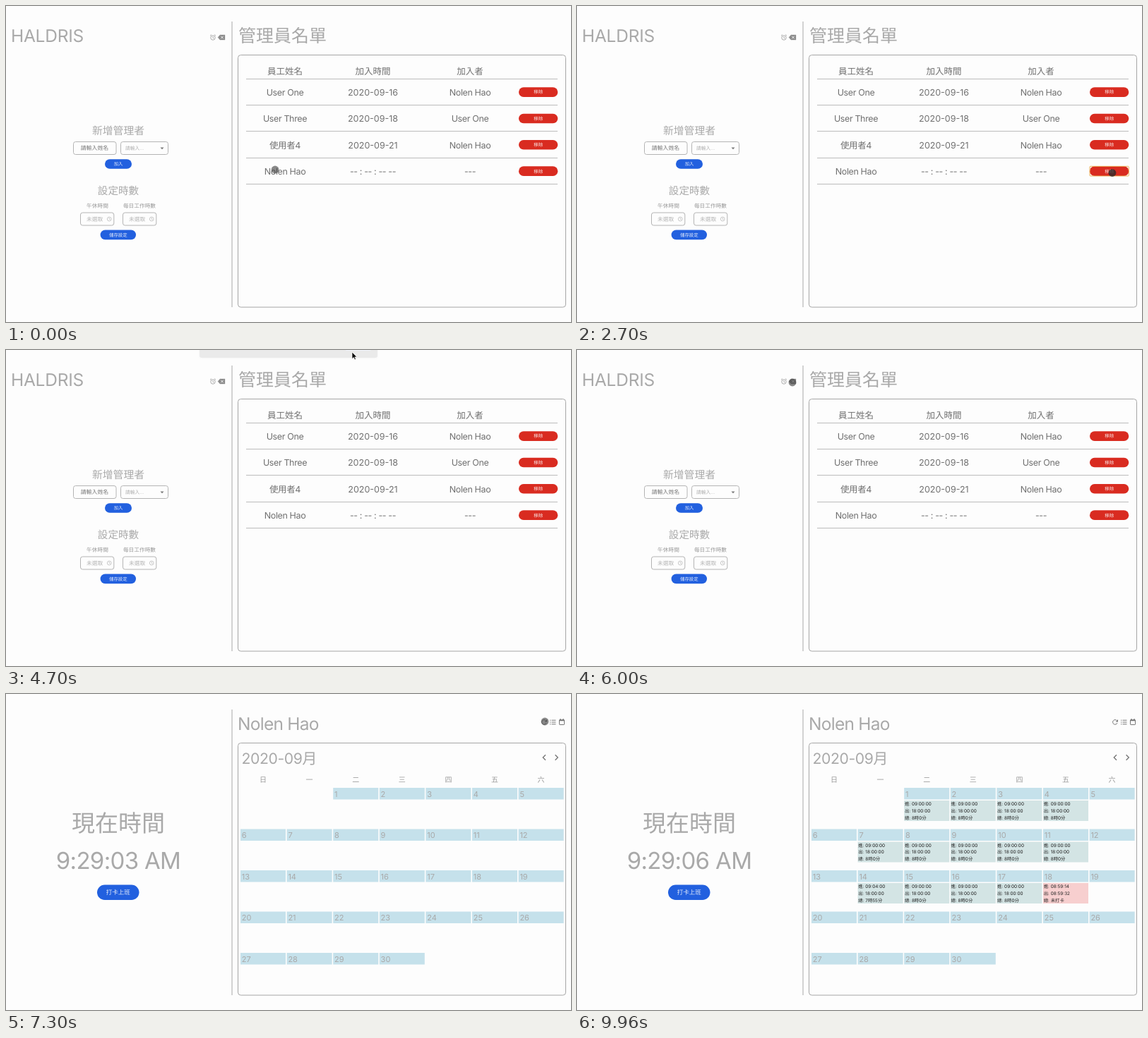
Animation, 800 px wide and 448 px high, one loop 10000 ms. Source, as an HTML page:

```html
<!DOCTYPE html>
<html lang="zh-Hant">
<head>
<meta charset="utf-8">
<title>Attendance admin</title>
<style>
html, body { margin: 0; width: 100%; height: 100%; overflow: hidden; background: #fdfdfd; }
svg { display: block; width: 100%; height: 100%; }
text {
  font-family: Inter, "Noto Sans CJK TC", "Noto Sans CJK", sans-serif;
  text-rendering: geometricPrecision;
  white-space: pre;
}
.sheet { filter: drop-shadow(0 1px 2px rgba(0, 0, 0, .35)); }
</style>
</head>
<body>
<svg id="stage" viewBox="0 0 800 448"></svg>
<script>
const LOOP = 10000;
const GRAY = '#a9a9a9', INK = '#707070', RED = '#d92b20', BLUE = '#2260df';
const RULE = '#bcbcbc', FIELD = '#b4b4b4';
const ADMIN = 'Nolen Hao';
const stage = document.getElementById('stage');

function el(parent, tag, attrs = {}) {
  const node = document.createElementNS('http://www.w3.org/2000/svg', tag);
  for (const k in attrs) node.setAttribute(k, attrs[k]);
  return parent.appendChild(node);
}
const group = (parent = stage) => el(parent, 'g');

// cy is the optical middle of the line
function label(parent, str, x, cy, size, fill, anchor = 'start', track = 0) {
  const t = el(parent, 'text', {
    x, y: cy + size * 0.364, 'font-size': size, fill,
    'text-anchor': anchor, 'letter-spacing': track + 'em'
  });
  t.textContent = str;
  return t;
}
const mid = (p, str, x, cy, size, fill, track) => label(p, str, x, cy, size, fill, 'middle', track);

function box(parent, x, y, width, height, rx, fill, stroke = 'none') {
  return el(parent, 'rect', { x, y, width, height, rx, fill, stroke });
}
function path(parent, d, stroke, width = 1, fill = 'none') {
  return el(parent, 'path', { d, stroke, fill, 'stroke-width': width });
}
function pill(parent, x, y, w, h, fill, str, size) {
  box(parent, x, y, w, h, h / 2, fill);
  mid(parent, str, x + w / 2, y + h / 2, size, 'rgba(255,255,255,.9)');
}

// Shared frame
path(stage, 'M320 22V427', '#a8a8a8');
box(stage, 328.5, 69.5, 464, 357.5, 4, 'none', '#a6a6a6');

// Admin page
const admin = group();
label(admin, 'HALDRIS', 7, 42, 24.5, GRAY, 'start', -0.01);
label(admin, '管理員名單', 329, 42, 25, GRAY);

el(admin, 'circle', { cx: 293, cy: 45, r: 3.2, fill: 'none', stroke: '#999', 'stroke-width': 0.8 });
path(admin, 'M289 42.3l2-1.8M297 42.3l-2-1.8M293 43.2v2l1.5 1', '#999', 0.8);
path(admin, 'M300 44.5l3-3.6h7v7.2h-7z', '#8a8a8a', 0.3, '#8a8a8a');
path(admin, 'M304.2 42.7l3.6 3.6M307.8 42.7l-3.6 3.6', '#fff', 0.9);

mid(admin, '新增管理者', 159, 177, 14.8, GRAY);
box(admin, 95.5, 192.5, 60.5, 18, 3, 'none', FIELD);
mid(admin, '請輸入姓名', 125.5, 201.5, 7.9, '#777');
box(admin, 162.5, 192.5, 67, 18, 3, 'none', FIELD);
label(admin, '請輸入...', 169, 201.5, 6.8, '#b0b0b0');
path(admin, 'M218.5 200.5h5l-2.5 2.7z', 'none', 0, '#777');
pill(admin, 140, 217.2, 38, 13.6, BLUE, '加入', 6.3);

mid(admin, '設定時數', 159, 262, 14.6, GRAY);
mid(admin, '午休時間', 129.5, 283, 7.7, '#999');
mid(admin, '每日工作時數', 189, 283, 7.7, '#999');
for (const x of [105.5, 165.5]) {
  box(admin, x, 293, 47.3, 18, 3, 'none', FIELD);
  label(admin, '未選取', x + 8.5, 302, 7.7, '#b5b5b5');
  el(admin, 'circle', { cx: x + 40.7, cy: 302, r: 2.9, fill: 'none', stroke: FIELD, 'stroke-width': 0.7 });
  path(admin, `M${x + 40.7} 300.2v2l1.4 .8`, FIELD, 0.7);
}
pill(admin, 133.6, 317.6, 50.4, 13.6, BLUE, '儲存設定', 6.4);

const columns = [395, 519.5, 657];
['員工姓名', '加入時間', '加入者'].forEach((s, i) => mid(admin, s, columns[i], 92, 12.5, INK));
path(admin, 'M340 103.5H781', RULE);
[
  ['User One', '2020-09-16', ADMIN],
  ['User Three', '2020-09-18', 'User One'],
  ['使用者4', '2020-09-21', ADMIN],
  [ADMIN, '-- : -- : -- --', '---']
].forEach((row, r) => {
  const y = 122.5 + r * 37.35;
  row.forEach((s, i) => mid(admin, s, columns[i], y, 12.5, INK, s[0] === '2' ? 0 : -0.03));
  pill(admin, 726, y - 7.2, 55.3, 13.6, RED, '移除', 6.5);
  path(admin, `M340 ${Math.floor(y + 18) + 0.5}H781`, RULE);
});
const focusRing = box(admin, 726, 227.3, 55.3, 13.7, 1, 'none', '#e9a545');
focusRing.setAttribute('stroke-width', 0.9);

// Calendar page
const calendar = group();
label(calendar, ADMIN, 328, 42, 24.5, GRAY, 'start', -0.03);
label(calendar, '2020-09月', 333.5, 91, 21.2, GRAY, 'start', -0.02);
mid(calendar, '現在時間', 159, 183, 33, GRAY);
const clock = mid(calendar, '', 159, 235.5, 33, GRAY, -0.02);
pill(calendar, 129, 270.5, 59.5, 21.5, BLUE, '打卡上班', 8.5);

path(calendar, 'M764.6 38A3.3 3.3 0 1 0 765 41', '#777', 1);
path(calendar, 'M766 36v3.4h-3.4z', 'none', 0, '#777');
path(calendar, 'M770 37.2h1.3M772.5 37.2h6M770 40h1.3M772.5 40h6M770 42.8h1.3M772.5 42.8h6', '#777', 1);
box(calendar, 783.5, 36.8, 7, 6.7, 0.6, 'none', '#777');
path(calendar, 'M783 37.5h8M785 35v2M789 35v2', '#777', 1.3);
path(calendar, 'M764 86.3l-3.7 3.7 3.7 3.7M777.6 86.3l3.7 3.7-3.7 3.7', '#777', 1.4);

const PITCH = 65.6;
[...'日一二三四五六'].forEach((s, i) => mid(calendar, s, 364 + i * PITCH, 121, 10, '#999'));
const entries = group(calendar);
for (let day = 1; day <= 30; day++) {
  const slot = day + 1, col = slot % 7, row = Math.floor(slot / 7);
  const x = 332 + col * PITCH, y = 133 + row * 58.5;
  box(calendar, x, y, 64, 16.5, 0, '#c5e1eb');
  label(calendar, day, x + 1.8, y + 8.7, 11, GRAY);
  if (day > 18 || col === 0 || col === 6) continue;

  let lines = ['09:00:00', '18:00:00', '8時0分'];
  if (day === 14) lines = ['09:04:00', '18:00:00', '7時55分'];
  if (day === 18) lines = ['08:59:14', '08:59:32', '未打卡'];
  box(entries, x, y + 18, 64, 29, 0, day === 18 ? '#f7cfcf' : '#d3e4e4');
  lines.forEach((s, i) => label(entries, '進出總'[i] + ': ' + s, x + 0.7, y + 22.8 + i * 9.7, 6.4, '#222'));
}

// Alert sheet, mostly above the stage
const alertBox = group();
box(alertBox, 274, -80, 252, 102, 3, '#202124').setAttribute('class', 'sheet');
box(alertBox, 480.5, -8, 36.5, 20, 2, '#7fa8f2');
mid(alertBox, 'OK', 498.5, 3, 6.8, '#202124');

// Pointer
const dot = el(stage, 'circle', { r: 5.4 });
const arrow = path(stage, 'M0 0V9.6L2.3 7.5L3.8 10.8L5.4 10.1L3.9 6.9H6.8Z', '#fff', 0.7, '#000');

const route = [
  [0, 381, 232], [100, 381, 232], [1100, 758, 237], [2600, 758, 237], [3200, 757, 231],
  [3750, 757, 231], [4500, 490, 3], [4780, 490, 3], [5150, 305, 46], [6240, 305, 46],
  [6660, 368, 67], [7300, 763, 39], [7750, 791, 38], [8200, 782, 38],
  [8650, 782, 38], [9300, 692, 30], [9850, 625, -8], [LOOP, 625, -8]
];
const presses = [[1350, 1600], [2650, 2800], [6080, 6230], [8180, 8450]];

const within = (t, a, b) => t >= a && t < b;
const ramp = (t, a, b) => Math.min(1, Math.max(0, (t - a) / (b - a)));
const show = (node, on) => node.setAttribute('visibility', on ? 'inherit' : 'hidden');

function pointerAt(t) {
  const i = route.findIndex(p => p[0] > t);
  const [t0, x0, y0] = route[i - 1], [t1, x1, y1] = route[i];
  const u = ramp(t, t0, t1), k = u * u * (3 - 2 * u);
  return [x0 + (x1 - x0) * k, y0 + (y1 - y0) * k];
}

function render(t) {
  const onCalendar = t >= 6200;
  show(admin, !onCalendar);
  show(calendar, onCalendar);
  show(focusRing, !onCalendar && within(t, 2700, 4680));
  show(entries, onCalendar && t >= 7330);
  clock.textContent = t < 6800 ? '00:00:00 AM' : `9:29:0${3 + Math.floor((t - 6800) / 1000)} AM`;

  const open = ramp(t, 3260, 3400), close = ramp(t, 4600, 4710);
  const shown = open * (1 - close);
  alertBox.setAttribute('opacity', shown);
  alertBox.setAttribute('transform', `translate(0 ${-12 * (1 - shown)})`);

  const [x, y] = pointerAt(t);
  const asArrow = within(t, 3260, 4800);
  show(dot, !asArrow);
  show(arrow, asArrow);
  dot.setAttribute('cx', x);
  dot.setAttribute('cy', y);
  dot.setAttribute('fill', presses.some(p => within(t, ...p)) ? 'rgba(40,40,40,.78)' : 'rgba(64,64,64,.62)');
  arrow.setAttribute('transform', `translate(${x} ${y})`);
}

const start = performance.now();
function tick() {
  render((performance.now() - start) % LOOP);
  requestAnimationFrame(tick);
}
tick();
</script>
</body>
</html>
```
